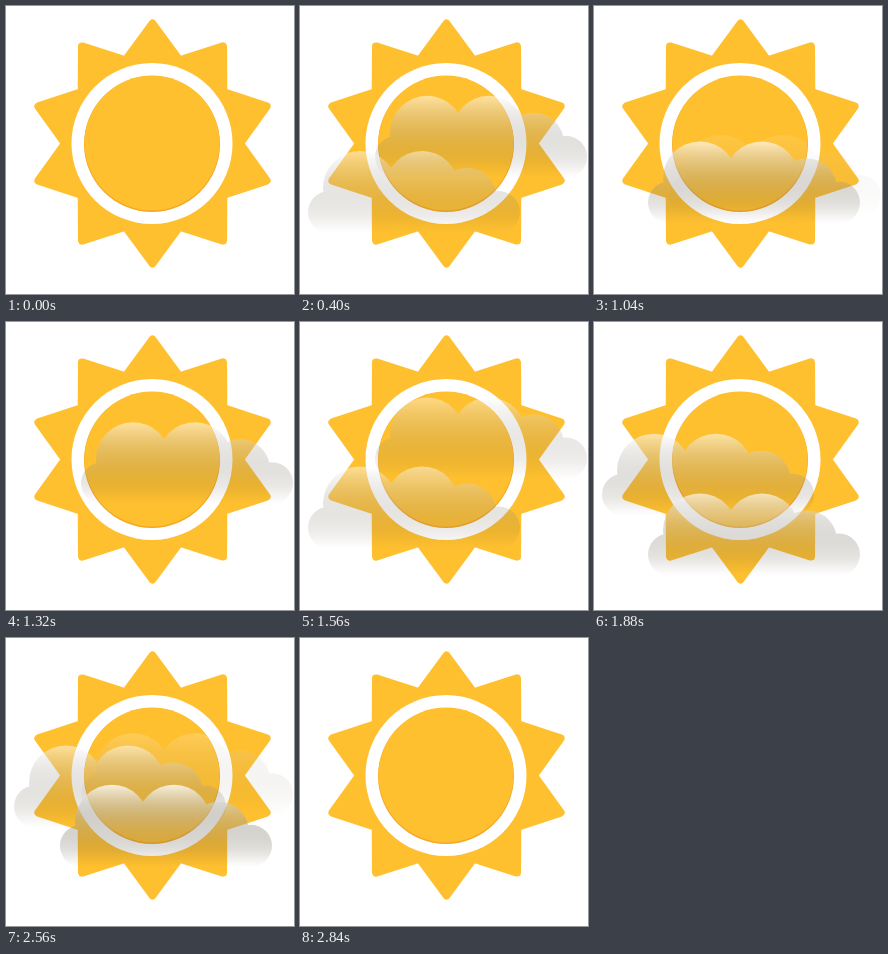
An HTML page that plays this animation: 288 px wide and 288 px high, repeating every 2880 ms.

```html
<!DOCTYPE html>
<html lang="en">
<head>
<meta charset="utf-8">
<title>Hazy sun</title>
<style>
  html, body { margin: 0; width: 100%; height: 100%; overflow: hidden; background: #fff; }
  svg { display: block; width: 100%; height: 100%; }
</style>
</head>
<body>
<svg viewBox="0 0 288 288">
  <defs>
    <linearGradient id="haze" x2="0" y2="1">
      <stop offset="0" stop-color="#fff" stop-opacity=".92"/>
      <stop offset=".5" stop-color="#9a958a" stop-opacity=".48"/>
      <stop offset=".8" stop-color="#5a503c" stop-opacity=".2"/>
      <stop offset="1" stop-color="#5a503c" stop-opacity="0"/>
    </linearGradient>
    <path id="cloud" fill="url(#haze)"/>
  </defs>
  <polygon id="rays" fill="#ffc02f" stroke="#ffc02f" stroke-width="8" stroke-linejoin="round"/>
  <circle cx="146" cy="137.5" r="80.5" fill="#fff"/>
  <circle cx="146" cy="138" r="68" fill="#f5a623"/>
  <circle cx="146" cy="137" r="67.5" fill="#ffc02f"/>
  <g id="clouds"></g>
</svg>
<script>
const LOOP = 2880, STEP = 40, LIFE = 700;
const $ = id => document.getElementById(id);

// Ten rays: alternating tips and notches around the centre.
$('rays').setAttribute('points', Array.from({ length: 20 }, (_, i) => {
  const angle = i * Math.PI / 10, r = i % 2 ? 87.5 : 120;
  return [146.5 + r * Math.sin(angle), 137.5 - r * Math.cos(angle)].map(v => v.toFixed(2));
}).join(' '));

// A cloud is a union of round lobes on a flat base.
const lobe = (x, top, r) => `M${x} ${top}a${r} ${r} 0 0 1 0 ${2 * r}a${r} ${r} 0 0 1 0 ${-2 * r}z`;
$('cloud').setAttribute('d',
  lobe(75, 40, 21) + lobe(106, 0, 37) + lobe(168, 0, 37) +
  lobe(213, 17, 30) + lobe(245, 40, 21) + 'M75 50H245V82H75z');

const linear = k => k;
const easeOut = k => 1 - (1 - k) ** 2;

function drift(lane, start, rise = 72, ease = linear) {
  const node = document.createElementNS('http://www.w3.org/2000/svg', 'use');
  node.setAttribute('href', '#cloud');
  $('clouds').append(node);
  return { node, start, rise, ease, ...lane };
}

// Lanes from back to front.
const right = { shift: 21, from: 131, strength: .6 };
const left = { shift: -46, from: 161, strength: .7 };
const middle = { shift: 0, from: 190, strength: .9 };
const drifts = [
  drift(right, 0), drift(right, 1020), drift(right, 1910, 36, easeOut),
  drift(left, 245), drift(left, 1400), drift(left, 2040),
  drift(middle, 510), drift(middle, 1700), drift(middle, 2140)
];

// Every cloud rises while fading in and out again.
function draw(now) {
  const t = Math.floor(now % LOOP / STEP) * STEP;
  for (const { node, start, rise, ease, shift, from, strength } of drifts) {
    const k = Math.min(1, Math.max(0, (t - start) / LIFE));
    const glow = Math.max(0, Math.sin(Math.PI * k)) ** .7;
    node.setAttribute('transform', `translate(${shift} ${from - rise * ease(k)})`);
    node.setAttribute('opacity', (strength * glow).toFixed(3));
  }
}

let begin;
function tick(now) {
  begin ??= now;
  draw(now - begin);
  requestAnimationFrame(tick);
}
draw(0);
requestAnimationFrame(tick);
</script>
</body>
</html>
```
